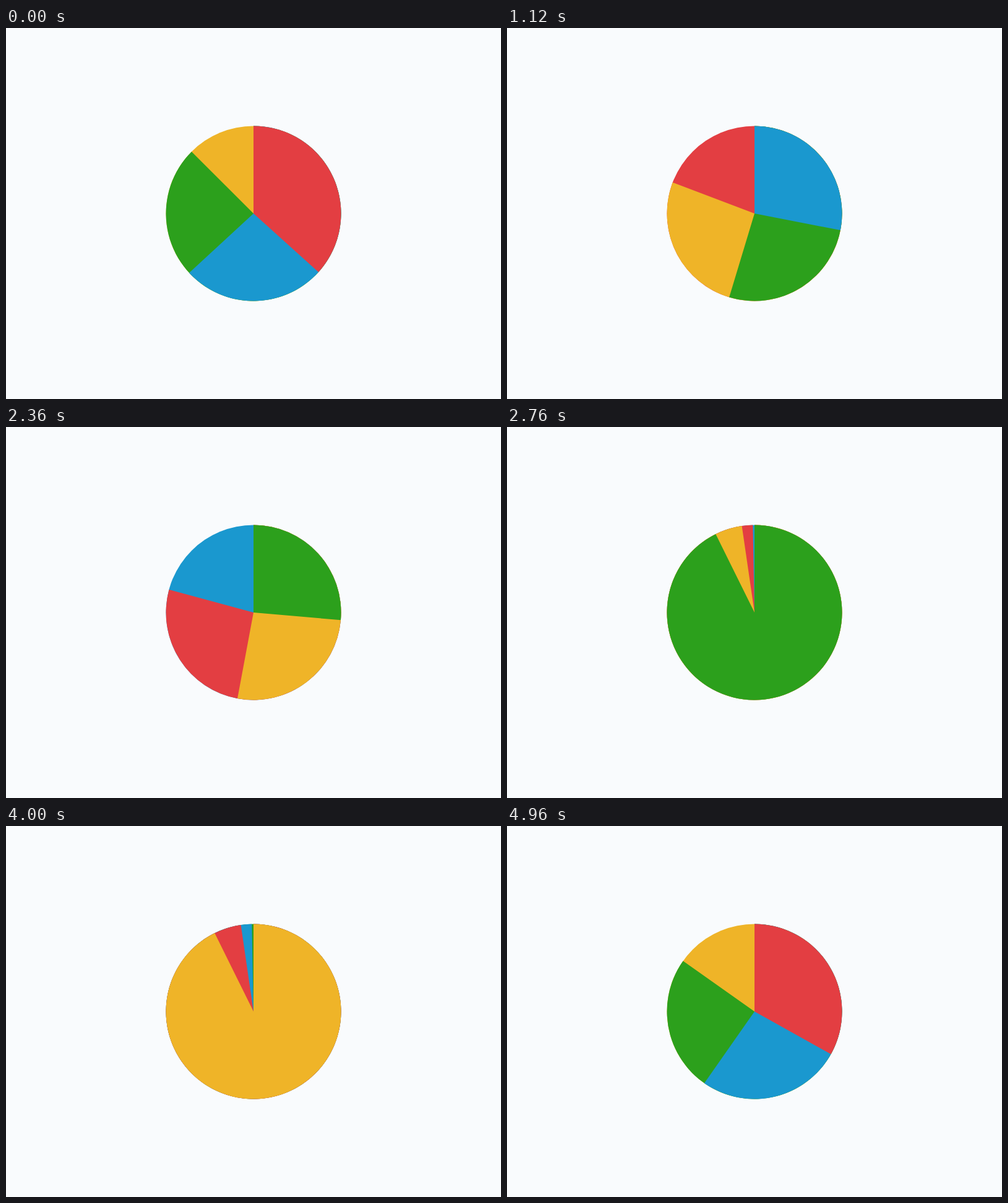
Recreate the animation shown at these times as an HTML page. Size 800 px wide and 600 px high, loop 5 s.

```html
<!DOCTYPE html>
<html lang="en">
<head>
<meta charset="utf-8">
<title>Pie loop</title>
<style>
  html, body { margin: 0; width: 100%; height: 100%; overflow: hidden; background: #f9fbfd; }
  svg { display: block; width: 800px; height: 600px; }
</style>
</head>
<body>
<svg viewBox="0 0 800 600">
  <circle id="base" cx="400" cy="300" r="141.5"/>
  <path class="arc"/>
  <path class="arc"/>
  <path class="arc"/>
</svg>
<script>
const STEP = 40, TICKS = 125, R = 141.5;
const COLORS = ['#e33e42', '#1a98cf', '#2ca01c', '#efb428'];
const CENTERS = [-6, 25, 57, 88, 119];  // middle tick of each turn

// Ticks after the middle of a turn, and the sweep in degrees by then.
const KNOTS = [0, 3, 5, 6, 9, 12, 15.5];
const LEAD = [275, 290.8, 305.3, 315, 351.5, 358.9, 360];
const MID = [180, 196.8, 215, 227.3, 305.8, 351.7, 360];
const TRAIL = [85, 101, 119.2, 132.1, 213.1, 333.7, 360];

// The first half of a turn mirrors the second, with lead and trail swapped.
const mirror = a => a.slice(1).reverse();
const xs = [...mirror(KNOTS).map(x => -x), ...KNOTS];
const join = (after, twin) => [...mirror(twin).map(v => 360 - v), ...after];
const curves = [join(LEAD, TRAIL), join(MID, MID), join(TRAIL, LEAD)].map(monotone);

// Monotone cubic through the points (xs, ys), flat at both ends.
function monotone(ys) {
  const h = [], d = [], m = [0];
  const n = xs.length - 1;
  for (let i = 0; i < n; i++) {
    h[i] = xs[i + 1] - xs[i];
    d[i] = (ys[i + 1] - ys[i]) / h[i];
  }
  for (let i = 1; i < n; i++) {
    const a = 2 * h[i] + h[i - 1], b = h[i] + 2 * h[i - 1];
    m[i] = (a + b) / (a / d[i - 1] + b / d[i]);
  }
  m[n] = 0;
  return x => {
    if (x <= xs[0]) return ys[0];
    if (x >= xs[n]) return ys[n];
    let i = 0;
    while (x > xs[i + 1]) i++;
    const s = (x - xs[i]) / h[i], r = 1 - s;
    return ys[i] * (1 + 2 * s) * r * r + ys[i + 1] * s * s * (3 - 2 * s)
      + h[i] * s * r * (m[i] * r - m[i + 1] * s);
  };
}

function wedge(deg) {
  if (deg < 0.01) return '';
  const a = Math.min(deg, 359.99) * Math.PI / 180;
  const x = 400 + R * Math.sin(a), y = 300 - R * Math.cos(a);
  return `M400 300V${300 - R}A${R} ${R} 0 ${deg > 180 ? 1 : 0} 1 ${x.toFixed(3)} ${y.toFixed(3)}Z`;
}

const base = document.getElementById('base');
const arcs = document.querySelectorAll('.arc');

function draw(ms) {
  const tick = Math.floor((ms + 1) / STEP) % TICKS;
  let k = 0;
  while (k < 4 && tick >= (CENTERS[k] + CENTERS[k + 1]) / 2) k++;
  const x = tick - CENTERS[k];
  base.setAttribute('fill', COLORS[(k + 3) % 4]);
  arcs.forEach((arc, i) => {
    arc.setAttribute('fill', COLORS[(k + 2 - i) % 4]);
    arc.setAttribute('d', wedge(curves[i](x)));
  });
}

const start = performance.now();
function loop() {
  draw(performance.now() - start);
  requestAnimationFrame(loop);
}
loop();
</script>
</body>
</html>
```
